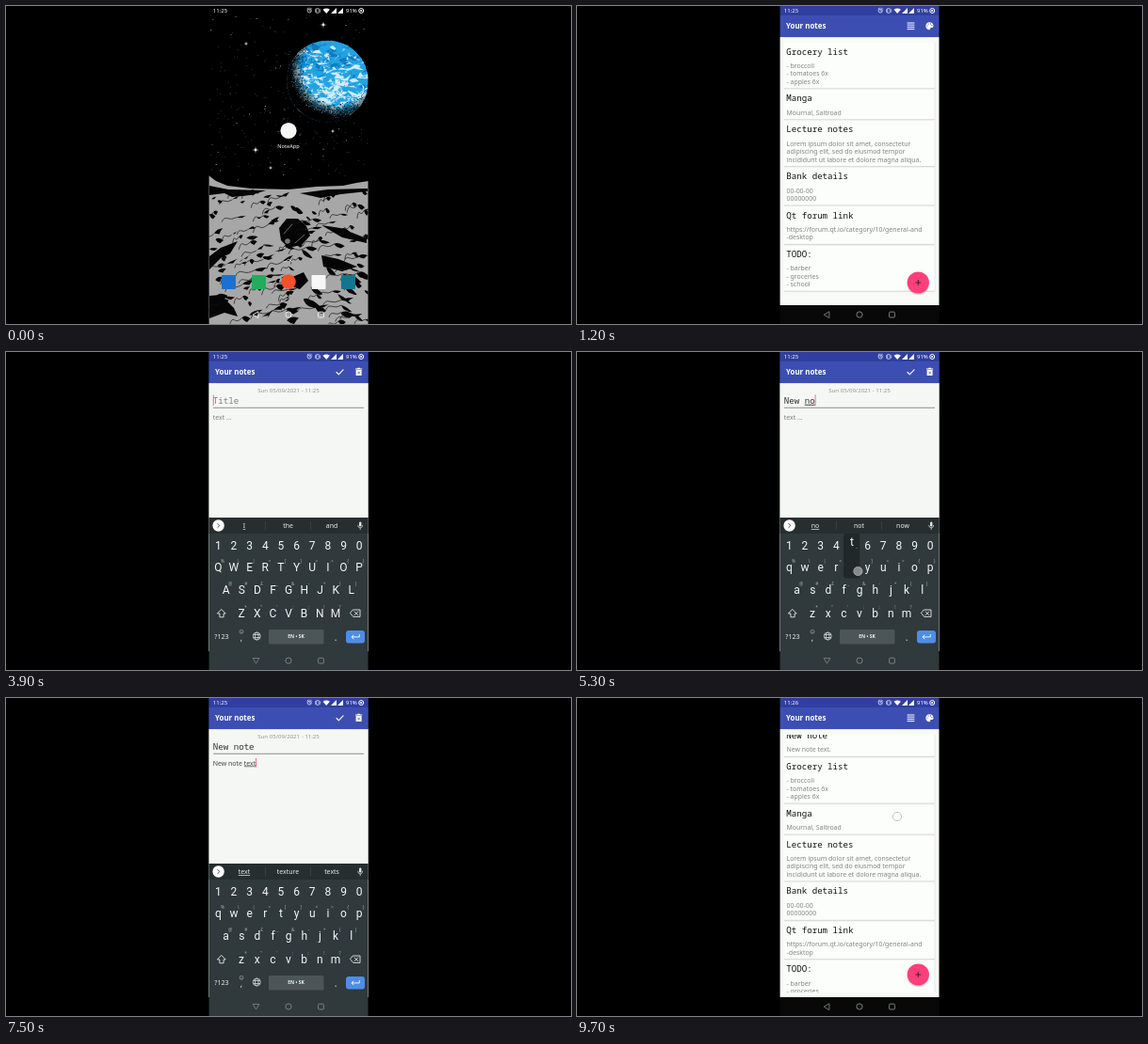
Recreate the animation shown at these times as an HTML page. Size 600 by 338 pixels, loop 9800 ms.

```html
<!DOCTYPE html>
<html lang="en">
<head>
<meta charset="utf-8">
<title>Notes app</title>
<style>
  html, body { margin: 0; width: 100%; height: 100%; overflow: hidden; background: #000; }
  svg { display: block; width: 100vw; height: 100vh; }
  text { font-family: "Noto Sans", sans-serif; white-space: pre; }
  .mono { font-family: "Noto Sans Mono", monospace; font-size: 9.15px; font-weight: 500; }
  .body { font-size: 6.93px; }
  .key { font-family: Roboto, sans-serif; font-size: 12px; fill: #f4f6f6; text-anchor: middle; }
  .hint { font-size: 4.8px; fill: #a4acae; text-anchor: middle; }
  .mid { text-anchor: middle; }
  .line { fill: none; stroke-linecap: round; stroke-linejoin: round; }
</style>
</head>
<body>
<svg id="stage" viewBox="0 0 600 338"></svg>
<script>
const LOOP = 9800, STEP = 100;
const LEFT = 215, WIDTH = 170;

const rect = (x, y, w, h, fill, more = '') =>
  `<rect x="${x}" y="${y}" width="${w}" height="${h}" fill="${fill}" ${more}/>`;
const circle = (x, y, r, fill, more = '') => `<circle cx="${x}" cy="${y}" r="${r}" fill="${fill}" ${more}/>`;
const path = (d, fill, more = '') => `<path d="${d}" fill="${fill}" ${more}/>`;
const line = (d, color, width = 1) => `<path class="line" d="${d}" stroke="${color}" stroke-width="${width}"/>`;
const text = (x, y, s, more = '') => `<text x="${x}" y="${y}" ${more}>${s}</text>`;
const group = (id, inner, more = '') => `<g id="${id}" ${more}>${inner}</g>`;
const clamp = v => Math.max(0, Math.min(1, v));
const ramp = (t, from, to) => clamp((t - from) / (to - from));
const easeOut = p => 1 - (1 - p) ** 3;

let seed = 11;
const random = () => (seed = (seed * 16807) % 2147483647) / 2147483647;
const spread = (from, to) => Math.round((from + random() * (to - from)) * 10) / 10;

// Home screen
function stars() {
  let small = '';
  for (let i = 0; i < 260; i++) {
    const size = random() < .15 ? .9 : .5;
    small += `M${spread(216, 384)} ${spread(8, 186)}h${size}v${size}h-${size}z`;
  }
  const bright = [[337, 20, 2], [265, 153, 2], [281, 172, 1.2], [255, 40, 1.2], [347, 133, 1.2]];
  return path(small, '#b5b5b5') + bright.map(([x, y, r]) =>
    circle(x, y, r * .7, '#fff') + line(`M${x - r * 1.5} ${y}h${r * 3}M${x} ${y - r * 1.5}v${r * 3}`, '#ddd', .4)).join('');
}

// The lit side faces the upper right; dots break up the fade into the night side.
function earth() {
  const cx = 341.5, cy = 80, r = 43.5;
  const blob = (x, y, size) => {
    let d = `M${x} ${y}`;
    for (let k = 0; k < 6; k++) d += `l${spread(-size, size)} ${spread(-size * .6, size * .6)}`;
    return d + 'z';
  };
  let clouds = '', land = '', dots = '', dust = '';
  for (let i = 0; i < 60; i++) land += blob(spread(302, 384), spread(38, 84), 6);
  for (let i = 0; i < 30; i++) clouds += blob(spread(308, 380), spread(42, 66), 4);
  for (let i = 0; i < 130; i++) clouds += blob(spread(308, 384), spread(66, 112), 6);
  for (let i = 0; i < 4500; i++) {
    const a = random() * 6.283, q = Math.sqrt(random()) * r;
    const x = cx + q * Math.cos(a), y = cy + q * Math.sin(a);
    const shade = clamp((Math.hypot(x - 353, y - 66) - 36) / 18);
    const dot = `M${x.toFixed(1)} ${y.toFixed(1)}h.8v.8h-.8z`;
    if (random() < shade) dots += dot;
    else if (shade > .55 && random() < .7) dust += dot;
  }
  return '<radialGradient id="night" gradientUnits="userSpaceOnUse" cx="353" cy="66" r="56">' +
    '<stop offset=".68" stop-opacity="0"/><stop offset=".93"/></radialGradient>' +
    `<clipPath id="globe">${circle(cx, cy, r, '#fff')}</clipPath><g clip-path="url(#globe)">` +
    circle(cx, cy, r, '#22a3e2') + path(land, '#0f78c0') + path(clouds, '#cdeefa') +
    circle(cx, cy, r, 'url(#night)') + path(dots, '#000') + path(dust, '#8b8b8b') + '</g>';
}

function moon() {
  const shadows = [
    'M216 191l20 4 40 1-16 5-20 2-8-4-16 2z',
    'M312 199l30-4 42-1v3l-28 3-22 4z',
    'M290 236l8-10 12 0 9 8 4 10-9 10-14 3-8-8z',
    'M216 266l12-9 18-7-8 13-10 5-12 12z',
    'M335 233l20 3 28 11v5l-26-6z',
    'M335 265l18 4 20 8-16 5-20-5z',
    'M304 288l12-5 5 9-9 9-9-3z',
    'M216 308l12-1 14 14 4 9-14-4-16 6z'
  ];
  let slivers = '', cracks = '';
  const count = 150;
  for (let i = 0; i < count; i++) {
    const depth = i / count, x = spread(210, 382), y = 196 + depth * 140;
    const w = spread(4, 9 + depth * 9), h = spread(1, 3.5 + depth * 2);
    const rise = w * (spread(-.75, .25) + (x > 300 ? .5 : 0));
    slivers += `M${x} ${y}q${w * .3} ${rise * .2 - h} ${w} ${rise}q${-w * .2} ${h * .4} ${-w * .4} ${h - rise * .4}` +
      `q${-w * .4} ${-h * .2} ${-w * .6} ${-h - rise * .6}z`;
    if (i % 2) cracks += `M${x} ${y}q${-w * .5} ${h + 1} ${-w * .9} ${h * .6}t${-w * .6} ${h + 2}`;
  }
  return path('M215 180l8 6 12 5 25 3 40 1 30-3 28-1 14-3 13-2v152H215z', '#a7a7a7') +
    path(shadows.join(''), '#050505') + path(slivers, '#060606') + line(cracks, '#151515', .7) +
    line('M295 242l9-10M307 252l10-9', '#999', .7) +
    circle(299, 250, 2.8, '#777') + line('M296 272l4-3 4 3', '#ddd', .8);
}

const dock = () => [[236.5, '#1b70d3'], [268.5, '#1fae5b'], [332, '#f7f7f7'], [363.5, '#11768f']]
  .map(([x, color]) => rect(x - 7.5, 286, 15, 15, color, 'rx="1"')).join('') + circle(300, 293, 7.8, '#f6502a');

const home = () => rect(LEFT, 0, WIDTH, 338, '#000') + stars() + earth() + moon() +
  circle(300, 132.5, 8.6, '#f5f7f2') +
  text(300, 151, 'NoteApp', 'class="mid" font-size="5.6" fill="#fff"') + dock();

// App bars
const statusBar = () => text(219.8, 7.1, '11:25', 'id="clock" font-size="6" fill="#fff"') +
  line('M320 3l1-1M324.5 3l-1-1M322.2 3.7v1.4h1', '#fff', .6) +
  '<circle cx="322.2" cy="5" r="2.1" fill="none" stroke="#fff" stroke-width=".7"/>' +
  line('M330 2.7h2.2v4.6H330zM328.6 3.6v2.8M333.6 3.6v2.8', '#fff', .6) +
  path('M336.5 3.8q3.7-2.8 7.4 0L340.2 8z', '#fff') +
  path('M351 2v6h-6zM358 2v6h-6z', '#fff') +
  text(361, 7.1, '91%', 'font-size="6" fill="#fff"') +
  '<circle cx="377.2" cy="5" r="2.5" fill="none" stroke="#fff" stroke-width="1"/>' + circle(377.2, 5, 1.1, '#fff');

const appBar = () => rect(LEFT, 0, WIDTH, 10.2, '#303f9f') + rect(LEFT, 10, WIDTH, 23, '#3d4eb3') +
  rect(LEFT, 33, WIDTH, .8, '#000', 'opacity=".1"') +
  text(222, 24.3, 'Your notes', 'font-size="7.9" font-weight="700" fill="#fff"');

const listIcons = () => line('M351 18h7M351 20.2h7M351 22.4h7M351 24.6h7', '#fff', 1) +
  path('M374.4 17.2c-5.3 0-5.3 8 0 8 1.3 0 .3-1.8 1.3-2.1 1-.2 2.8.3 2.8-2.2 0-2.2-1.9-3.7-4.1-3.7z', '#fff') +
  [[372, 21], [373.2, 19], [375.5, 18.9], [376.9, 20.6]].map(([x, y]) => circle(x, y, .6, '#3d4eb3')).join('');

const pageIcons = () => line('M351 21.5l2.3 2.3 4.8-5', '#fff', 1.1) +
  path('M371.6 19h6v6h-6zM371 17.4h2l.6-.6h2l.6.6h2v1h-7.2z', '#fff') +
  line('M373.5 21l2.2 2.2M375.7 21l-2.2 2.2', '#3d4eb3', .7);

// Notes list
const notes = [
  ['New note', 'New note text.'],
  ['Grocery list', '- broccoli', '- tomatoes 6x', '- apples 6x'],
  ['Manga', 'Mournal, Saltroad'],
  ['Lecture notes', 'Lorem ipsum dolor sit amet, consectetur', 'adipiscing elit, sed do eiusmod tempor',
    'incididunt ut labore et dolore magna aliqua.'],
  ['Bank details', '00-00-00', '00000000'],
  ['Qt forum link', 'https://forum.qt.io/category/10/general-and', '-desktop'],
  ['TODO:', '- barber', '- groceries', '- school']
];
const cardHeight = lines => 24.6 + 8.4 * lines;

function cards() {
  let top = 38.5 - cardHeight(1);
  return notes.map(([title, ...lines]) => {
    const h = cardHeight(lines.length), y = top;
    top += h;
    return rect(220, y + .5, 160.3, h - .5, '#d3d6d3') + rect(220, y + .5, 159.8, h - 1.5, '#fcfefb') +
      text(222.3, y + 13, title, 'class="mono" fill="#111"') +
      lines.map((s, i) => text(222.5, y + 27.4 + i * 8.5, s, 'class="body" fill="#828482"')).join('');
  }).join('');
}

const listScreen = () => rect(LEFT, 33, WIDTH, 285, '#f8faf7') +
  `<clipPath id="listClip">${rect(216, 39, 168, 274, '#fff')}</clipPath>` +
  `<g id="list"><g clip-path="url(#listClip)">${group('cards', cards())}</g>` +
  circle(362.3, 295.2, 12, '#000', 'opacity=".12"') + circle(362.3, 294, 11.6, '#ff3f7d') +
  circle(362.3, 294, 11, '#fff', 'id="ripple" opacity="0"') +
  line('M359.8 294h5M362.3 291.5v5', '#222', .9) + '</g>' + appBar() + listIcons();

// Note page
const pageScreen = () => rect(LEFT, 33, WIDTH, 285, '#f5f7f4') +
  text(300, 43.1, 'Sun 05/09/2021 - 11:25', 'class="mid" font-size="6.1" fill="#929492"') +
  text(219.8, 54.8, '', 'id="title" class="mono"') + rect(220, 58.8, 160, .8, '#747674') +
  text(219.8, 71.5, '', 'id="body" class="body"') +
  rect(0, 0, .8, 10, '#ff4081', 'id="caret"') + appBar() + pageIcons();

// Keyboard: letters, first key centre, row centre, long-press hints
const rows = [
  ['1234567890', 225.3, 206, ''],
  ['qwertyuiop', 225.3, 228.5, '%\\|=[]<>{}'],
  ['asdfghjkl', 233.6, 253, '@#£_&-+()'],
  ['zxcvbnm', 250, 277.5, '*"\':;!?']
];
const escape = s => s.replace('&', '&amp;').replace('<', '&lt;');
const keys = { ' ': { x: 308, y: 302 }, '.': { x: 350, y: 302 } };
rows.forEach(([letters, x0, y, hints]) => [...letters].forEach((c, i) =>
  keys[c] = { x: x0 + 16.65 * i, y, hint: hints[i] || '' }));

function keyboard() {
  const letters = rows.map(([row]) => [...row].map(c => {
    const { x, y, hint } = keys[c];
    return text(x, y + 4.2, c, `class="key" data-key="${c}"`) +
      (hint ? text(x + 4.6, y - 4.8, escape(hint), 'class="hint"') : '');
  }).join('')).join('');
  return rect(LEFT, 176, WIDTH, 162, '#30393b') + rect(LEFT, 176, WIDTH, 17, '#262e30') +
    circle(225.6, 184.5, 6.2, '#fff') + line('M224.8 182.5l2 2-2 2', '#333', .9) +
    rect(275, 180, .5, 9, '#465053') + rect(323.5, 180, .5, 9, '#465053') +
    [253, 299.5, 346].map((x, i) =>
      text(x, 187, '', `class="mid body word" fill="#e9eded" ${i ? '' : 'text-decoration="underline"'}`)).join('') +
    rect(375, 180.5, 2.4, 5, '#dfe4e4', 'rx="1.2"') + line('M373.7 184.3q0 2.6 2.5 2.6t2.5-2.6M376.2 187v1.7', '#dfe4e4', .7) +
    letters +
    line('M229 273.7l4.2 4.3h-2.1v3.8h-4.2V278h-2.1z', '#e6eaea', .9) +
    line('M368.7 274h7.3v7.4h-7.3l-3-3.7zM370.2 276l3.5 3.5M373.7 276l-3.5 3.5', '#e6eaea', .9) +
    text(229, 304.5, '?123', 'class="mid" font-size="7.2" fill="#e6eaea"') +
    text(250, 307, ',', 'class="mid" font-size="9" fill="#e6eaea"') +
    '<circle cx="250" cy="297.3" r="2" fill="none" stroke="#aab" stroke-width=".6"/>' +
    line('M249 297.8q1 1 2 0', '#aab', .5) +
    '<g fill="none" stroke="#e6eaea" stroke-width=".7"><circle cx="266.3" cy="302" r="4"/>' +
    '<ellipse cx="266.3" cy="302" rx="1.8" ry="4"/><path d="M262.6 300.5h7.4M262.6 303.5h7.4"/></g>' +
    rect(279, 295, 58.5, 15.5, '#4c5558', 'rx="1.5"') +
    text(308, 304.4, 'EN • SK', 'class="mid" font-size="5" font-weight="600" fill="#f0f3f3"') +
    text(350, 306.5, '.', 'class="mid" font-size="10" fill="#e6eaea"') +
    rect(361, 296, 20, 13.5, '#4c8ee8', 'rx="3"') + line('M375.3 300.5v2.4h-8M369 301l-2 1.9 2 1.9', '#fff', .9) +
    group('popup', rect(-8.7, -35.5, 17, 47.5, '#20282a', 'rx="1.5"') +
      text(0, -22.5, '', 'class="key" id="popupKey"') + text(5, -20.5, '_', 'class="hint" font-weight="700"'));
}

const navBar = () => group('back', line('M-2.8 0l5.4-3.2v6.4z', 'currentColor', .9)) +
  '<circle cx="300" cy="328" r="3.1" fill="none" stroke="currentColor"/>' +
  '<rect x="331.6" y="325.2" width="5.8" height="5.8" rx="1" fill="none" stroke="currentColor"/>';

document.getElementById('stage').innerHTML =
  `<clipPath id="phone">${rect(215.6, 0, 168.9, 338, '#fff')}</clipPath>` +
  `<clipPath id="launchClip">${rect(0, 0, 0, 0, '#fff', 'id="launch"')}</clipPath>` +
  rect(0, 0, 600, 338, '#000') + '<g clip-path="url(#phone)">' + group('home', home()) +
  '<g clip-path="url(#launchClip)">' + listScreen() + group('page', pageScreen()) +
  rect(LEFT, 318, WIDTH, 20, '#080808') + '</g>' +
  group('keyboard', keyboard()) + statusBar() + group('nav', navBar()) +
  circle(0, 0, 4.6, '#fff', 'id="touch" fill-opacity=".45" stroke="#b4b4b4" stroke-width=".8"') + '</g>';

const $ = id => document.getElementById(id);
const words = [...document.querySelectorAll('.word')];
const letterKeys = [...document.querySelectorAll('[data-key]')];
const set = (node, attrs) => Object.entries(attrs).forEach(([k, v]) => node.setAttribute(k, v));
const show = (node, on) => node.setAttribute('display', on ? 'inline' : 'none');

// Each typed character is pressed at its time and committed one step later.
const titleTyping = { text: 'New note', presses: [4300, 4500, 4700, 4800, 5000, 5100, 5300, 5500] };
const bodyTyping = { text: 'New note text.', presses: [...Array(13).keys()].map(i => 6100 + i * 100).concat(7600) };
const typed = (field, t) => field.text.slice(0, field.presses.filter(p => p + STEP <= t).length);

const suggestions = {
  '': ['I', 'the', 'and'], N: ['N', 'No', 'Not'], Ne: ['Ne', 'New', 'Next'], New: ['New', 'News', 'Newly'],
  n: ['n', 'no', 'not'], no: ['no', 'not', 'now'], not: ['not', 'note', 'nothing'], note: ['note', 'notes', 'noted'],
  t: ['t', 'the', 'to'], te: ['te', 'tell', 'test'], tex: ['tex', 'text', 'texts'], text: ['text', 'texture', 'texts']
};
const taps = [
  [100, 300, 300, 133], [1800, 2000, 362, 295], [3100, 3300, 247, 52],
  [5900, 6000, 250, 70], [7900, 8100, 354, 21], [9500, 9800, 340, 126]
];

function fillField(node, value, hint, focused, ink) {
  const word = focused ? value.match(/\w*$/)[0] : '';
  const content = value ? value.slice(0, value.length - word.length) +
    (word ? `<tspan text-decoration="underline">${word}</tspan>` : '') : hint;
  if (node.innerHTML !== content) node.innerHTML = content;
  node.setAttribute('fill', value ? ink : '#7f817f');
  return value ? node.getComputedTextLength() : 0;
}

function drawPage(t) {
  const inBody = t >= 6000;
  const title = typed(titleTyping, t), body = typed(bodyTyping, t);
  const titleWidth = fillField($('title'), title, 'Title', !inBody, '#333');
  const bodyWidth = fillField($('body'), body, 'text ...', inBody, '#444');
  show($('caret'), t >= 3300 && t < 8000);
  set($('caret'), inBody ? { x: 219.8 + bodyWidth, y: 64, height: 9.5 } : { x: 219.8 + titleWidth, y: 45.5, height: 11.5 });
  const current = inBody ? body : title;
  const options = suggestions[current.match(/\w*$/)[0]] || suggestions[''];
  words.forEach((node, i) => node.textContent = options[i]);
  letterKeys.forEach(node => {
    const c = node.dataset.key;
    node.textContent = current ? c : c.toUpperCase();
  });
}

function drawPress(t) {
  let press = null;
  for (const field of [titleTyping, bodyTyping]) {
    const i = field.presses.findIndex(p => t >= p && t < p + STEP);
    if (i >= 0) press = field.text[i];
  }
  const key = press && keys[press.toLowerCase()];
  const letter = key && /\w/.test(press);
  show($('popup'), letter);
  if (letter) {
    $('popup').setAttribute('transform', `translate(${key.x} ${key.y})`);
    $('popupKey').textContent = press;
  }
  const tap = taps.find(([from, to]) => t >= from && t < to);
  const point = tap ? [tap[2], tap[3]] : key ? [key.x + 6.5, key.y + 4.5] : null;
  show($('touch'), point);
  if (point) set($('touch'), { cx: point[0], cy: point[1] });
}

function draw(t) {
  const open = easeOut(ramp(t, 200, 600));
  set($('launch'), {
    x: 300 + (LEFT - 300) * open, y: 132 * (1 - open), width: WIDTH * open, height: 338 * open
  });
  show($('home'), t < 700);
  $('list').setAttribute('opacity', ramp(t, 600, 1000));
  const pageAlpha = ramp(t, 2000, 2400) * (1 - ramp(t, 8200, 8500));
  $('page').setAttribute('opacity', pageAlpha);
  show($('page'), pageAlpha > 0);
  $('ripple').setAttribute('opacity', t >= 1800 && t < 2300 ? .25 : 0);

  const saved = t >= 8100;
  const scroll = ramp(t, 9500, 9700) * 8.7;
  $('cards').setAttribute('transform', `translate(0 ${(saved ? cardHeight(1) : 0) - scroll})`);
  $('clock').textContent = saved ? '11:26' : '11:25';

  const raised = easeOut(ramp(t, 3300, 3800)) * (1 - ramp(t, 8000, 8300));
  show($('keyboard'), raised > 0);
  $('keyboard').setAttribute('transform', `translate(0 ${162 * (1 - raised)})`);
  $('nav').setAttribute('color', t < 400 ? '#eee' : '#7c8081');
  $('back').setAttribute('transform', `translate(265.3 328) rotate(${raised > .5 ? -90 : 0})`);

  drawPage(t);
  drawPress(t);
}

const start = performance.now();
function tick() {
  const t = (performance.now() - start) % LOOP;
  draw(Math.floor(t / STEP) * STEP);
  requestAnimationFrame(tick);
}
tick();
</script>
</body>
</html>
```
